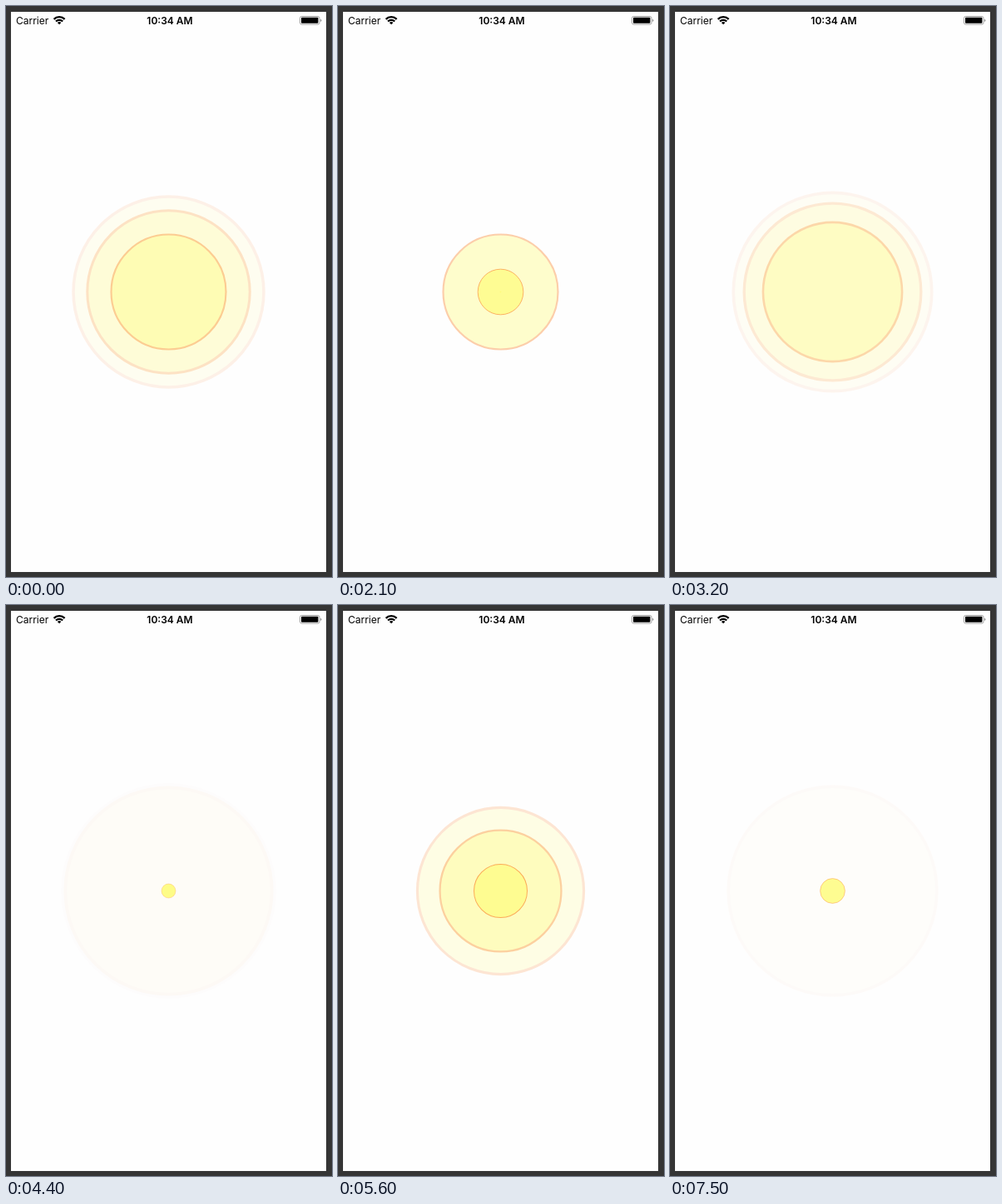
An HTML page that plays this animation: 392 px wide and 686 px high, repeating every 7.6 s.

```html
<!DOCTYPE html>
<html lang="en">
<head>
<meta charset="utf-8">
<title>Pulse</title>
<style>
  html, body { margin: 0; width: 100%; height: 100%; overflow: hidden; background: #353535; }
  svg { display: block; width: 392px; height: 686px; }
  text { font-family: Inter, Roboto, sans-serif; font-size: 12px; fill: #000; }
</style>
</head>
<body>
<svg viewBox="0 0 392 686" xmlns="http://www.w3.org/2000/svg">
  <rect width="392" height="686" fill="#353535"/>
  <rect x="6" y="7" width="379" height="673" fill="#fefefe"/>

  <text x="12" y="21.7">Carrier</text>
  <text x="197" y="21.7" text-anchor="middle" font-weight="600">10:34 AM</text>

  <g fill="none" stroke="#000" stroke-width="2.3">
    <path d="M57.6 15.9A9.2 9.2 0 0 1 70.6 15.9"/>
    <path d="M60 18.5A5.8 5.8 0 0 1 68.2 18.5"/>
  </g>
  <path d="M64.1 22.3L61.8 20A3.3 3.3 0 0 1 66.4 20Z"/>

  <rect x="353.5" y="12.5" width="23.5" height="9.6" rx="2" fill="none" stroke="#999" stroke-width="0.9"/>
  <rect x="355" y="13.8" width="20.4" height="7" rx="0.8"/>
  <path d="M378 15.7Q379.4 16 379.4 17.3T378 18.9Z" fill="#999"/>

  <g id="pulse" fill="#fffc79" stroke="#fa7d1e"></g>
</svg>
<script>
  const LOOP = 7600, STEP = 100, PERIOD = 3000;
  const START = 1160, DELAY = 450, COUNT = 3;
  const RADIUS = 130, BORDER = 4;

  const pulse = document.getElementById("pulse");
  const rings = Array.from({ length: COUNT }, () => {
    const ring = document.createElementNS("http://www.w3.org/2000/svg", "circle");
    ring.setAttribute("cx", 195.5);
    ring.setAttribute("cy", 343.5);
    return pulse.appendChild(ring);
  });

  const bezier = (a, b, s) => 3 * a * s * (1 - s) ** 2 + 3 * b * s * s * (1 - s) + s ** 3;

  // cubic-bezier(.25, .1, .25, 1), solved by bisection
  function ease(x) {
    let lo = 0, hi = 1;
    for (let i = 0; i < 24; i++) {
      const mid = (lo + hi) / 2;
      if (bezier(0.25, 0.25, mid) < x) lo = mid; else hi = mid;
    }
    return bezier(0.1, 1, lo);
  }

  function draw(time) {
    const t = Math.floor((time % LOOP) / STEP) * STEP;
    const states = rings.map((_, i) => {
      const age = t - START - i * DELAY + 2 * PERIOD;
      return ease((age % PERIOD) / PERIOD);
    });
    // largest first, so newer rings lie on top
    states.sort((a, b) => b - a).forEach((e, i) => {
      const width = BORDER * e;
      rings[i].setAttribute("r", RADIUS * e - width / 2);
      rings[i].setAttribute("stroke-width", width);
      rings[i].setAttribute("opacity", (1 - e) * (1 - 0.8 * e * (1 - e)));
    });
  }

  const begin = performance.now();
  function tick() {
    draw(performance.now() - begin);
    requestAnimationFrame(tick);
  }
  draw(0);
  requestAnimationFrame(tick);
</script>
</body>
</html>
```
